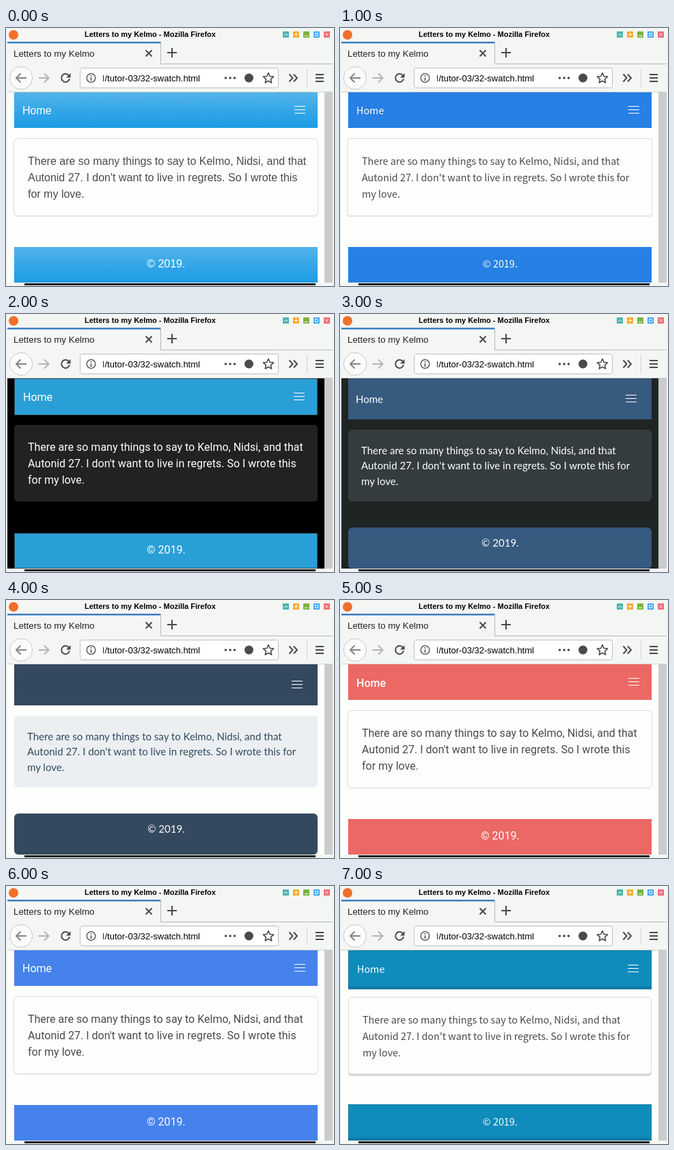
An HTML page for the animation above (8 s loop, 480 by 377 pixels).

```html
<!DOCTYPE html>
<html lang="en">
<head>
<meta charset="utf-8">
<title>Letters to my Kelmo</title>
<style>
html, body { margin: 0; width: 100%; height: 100%; overflow: hidden; background: #f4f6f4; }
svg { display: block; width: 480px; height: 377px; }
.ui { font-family: "Liberation Sans", Arial, sans-serif; white-space: pre; }
.line { fill: none; stroke: #4a4a4a; stroke-width: 2; }
</style>
</head>
<body>
<svg viewBox="0 0 480 377" xmlns="http://www.w3.org/2000/svg">
  <defs>
    <linearGradient id="sky" x1="0" y1="0" x2="0" y2="1">
      <stop offset="0" stop-color="#54b4eb"/>
      <stop offset=".6" stop-color="#2fa4e7"/>
      <stop offset="1" stop-color="#1d9ce5"/>
    </linearGradient>
    <clipPath id="view"><rect x="2" y="94" width="464" height="278"/></clipPath>
  </defs>
  <rect width="480" height="377" fill="#f4f6f4"/>

  <!-- title bar -->
  <circle cx="11" cy="10" r="7" fill="#f0702a"/>
  <text class="ui" x="115" y="13" font-size="11" font-weight="700">Letters to my Kelmo - Mozilla Firefox</text>
  <g id="buttons"></g>

  <!-- tab strip -->
  <path d="M226.500 20V52.500H478" fill="none" stroke="#b4b6b4"/>
  <rect x="2" y="20" width="224" height="2.500" fill="#3c7fc1"/>
  <text class="ui" x="11" y="42" font-size="13.330" fill="#222">Letters to my Kelmo</text>
  <path class="line" stroke-width="1.600" d="M204.500 32.500l9 9m0-9l-9 9"/>
  <path class="line" d="M236 36h14m-7-7v14"/>

  <!-- toolbar -->
  <circle cx="22" cy="73" r="16.500" fill="#fafbfa" stroke="#c6c8c6"/>
  <path class="line" style="stroke:#858785" d="M30 73H15m6.500-6.500L15 73l6.500 6.500"/>
  <path class="line" style="stroke:#b3b5b3" d="M47.500 73h15m-6.500-6.500l6.500 6.500-6.500 6.500"/>
  <path class="line" d="M92 69.500a6 6 0 1 0 1 4.800"/>
  <path fill="#4a4a4a" d="M94.500 66v6.500H88z"/>
  <rect x="108.500" y="58.500" width="290" height="29" rx="3" fill="#fff" stroke="#bcbebc"/>
  <circle class="line" cx="124.500" cy="73" r="6.300" style="stroke-width:1.300"/>
  <path class="line" style="stroke-width:1.600" d="M124.500 69v1.700m0 1.500v4.800"/>
  <rect x="142" y="69" width="1" height="9" fill="#222"/>
  <text class="ui" x="144.500" y="78" font-size="13">/tutor-03/32-swatch.html</text>
  <g fill="#4a4a4a">
    <circle cx="321.500" cy="73" r="1.800"/><circle cx="328" cy="73" r="1.800"/><circle cx="334.500" cy="73" r="1.800"/>
    <circle cx="355.500" cy="73" r="6.500"/>
  </g>
  <path id="star" class="line" style="stroke-width:1.600" stroke-linejoin="round"/>
  <path class="line" d="M414.500 67.500l5 5.500-5 5.500m6.500-11l5 5.500-5 5.500"/>
  <path d="M440.500 60v26" stroke="#d2d4d2"/>
  <path class="line" d="M453 68h12m-12 5h12m-12 5h12"/>
  <path d="M2 93.500h476" stroke="#cdcfcd"/>

  <!-- page -->
  <g id="page" clip-path="url(#view)"></g>
  <rect x="466" y="94" width="12" height="278" fill="#cbcbcb"/>
  <rect x="27" y="373" width="426" height="3" fill="#1b1b1b"/>
</svg>
<script>
const $ = id => document.getElementById(id);
const WHITE = '#fdfffd';
const ARIAL = '"Liberation Sans", Arial, sans-serif';
const ROBOTO = 'Roboto, sans-serif';
const LATO = 'Lato, sans-serif';
const SOURCE = '"Source Sans Pro", "Noto Sans CJK JP", "Noto Sans CJK SC", "Noto Sans CJK", sans-serif';

const WIDE = ['There are so many things to say to Kelmo, Nidsi, and that',
  "Autonid 27. I don't want to live in regrets. So I wrote this", 'for my love.'];
const TIGHT = [WIDE[0], WIDE[1] + ' for', 'my love.'];

// layout shared by most themes; each theme overrides a few values
const base = {
  bg: WHITE, ink: '#4a4a4a', font: ROBOTO, size: 16, lines: WIDE,
  navEnd: 146, home: [24, 126], homeInk: '#fff', homeStyle: '', burger: [422, 114.5],
  box: [162, 274], boxFill: WHITE, boxR: 5, ring: true,
  text: [32, 200, 24], foot: 320, footR: 0, footText: 350
};
// Noto Sans CJK draws its Latin letters about 12% larger
const source = { font: SOURCE, size: 14.33, lines: TIGHT };
const lato = {
  font: LATO, size: 15, lines: TIGHT, navEnd: 154, home: [23, 130], burger: [418, 118.5],
  box: [169, 274], boxR: 6, ring: false, text: [31, 204.7, 22.5],
  foot: 312, footR: 6, footText: 340
};

const themes = [
  { bar: 'url(#sky)', font: ARIAL },
  { ...source, bar: '#2780e3', boxR: 0 },
  { bar: '#2a9fd6', bg: '#000', ink: '#fff', navEnd: 148, edge: '#3a4a52', edgeBottom: 1,
    home: [25, 127], burger: [421, 115.5], boxFill: '#222', ring: false },
  { ...lato, bar: '#375a7f', bg: '#1f2424', ink: '#fff', boxFill: '#343c3d' },
  { ...lato, bar: '#34495e', ink: '#34495e', homeInk: '#34495e', boxFill: '#ebeff2' },
  { bar: '#eb6864', home: [24, 127], homeStyle: 'font-weight:500;font-stretch:85%' },
  { bar: '#4582ec' },
  { ...source, bar: '#0f8bbc', navEnd: 151, edge: '#0d78a3', edgeBottom: 4,
    home: [25, 127], burger: [421, 115.5], box: [162, 278], ring: false, lip: true,
    text: [33, 201, 24], foot: 319 }
].map(t => ({ ...base, ...t }));

const rect = (x, y, w, h, fill, r = 0, more = '') =>
  `<rect x="${x}" y="${y}" width="${w}" height="${h}" rx="${r}" fill="${fill}" ${more}/>`;
const label = (x, y, s, fill, more = '') => `<text x="${x}" y="${y}" fill="${fill}" ${more}>${s}</text>`;

function bar(t, top, end, r = 0) {
  if (!t.edge) return rect(12, top, 444, end - top, t.bar, r);
  return rect(12, top, 444, end - top, t.edge) +
    rect(13, top + 1, 442, end - top - 1 - t.edgeBottom, t.bar);
}

function card(t) {
  const [top, end] = t.box, h = end - top;
  let s = '';
  if (t.ring) {
    s += rect(12, top + 2, 444, h, '#0a0a0a', t.boxR, 'opacity=".06"');
    s += rect(11, top - 1, 446, h + 2, '#dcdedc', t.boxR && t.boxR + 1);
  }
  if (t.lip) {
    s += rect(12, top, 444, h, '#d9dbd9', 5);
    return s + rect(13, top + 1, 442, h - 5, t.boxFill, 4);
  }
  return s + rect(12, top, 444, h, t.boxFill, t.boxR);
}

function page(t) {
  const [bx, by] = t.burger, [tx, ty, step] = t.text;
  const burger = [0, 5, 10].map(d => `M${bx} ${by + d}h16`).join('');
  return rect(2, 94, 464, 278, t.bg) +
    bar(t, 94, t.navEnd) + card(t) + bar(t, t.foot, 372, t.footR) +
    `<path d="${burger}" stroke="#fff"/>` +
    `<g style='font-family:${t.font};font-size:${t.size}px'>` +
    label(...t.home, 'Home', t.homeInk, `style="${t.homeStyle}"`) +
    t.lines.map((s, i) => label(tx, ty + i * step, s, t.ink)).join('') +
    label(234.3, t.footText, '© 2019.', '#fff', 'text-anchor="middle"') + '</g>';
}

// window buttons: colour and glyph inside a 9px tile
$('buttons').innerHTML = [
  ['#4db6ac', 'M2 6l2.500-2.500L7 6'],
  ['#ffa726', 'M4.500 1.500v6m-3-3h6'],
  ['#7cb342', 'M2 6.500h5'],
  ['#42a5f5', 'M2.500 2.500h4v4h-4z'],
  ['#ef6c75', 'M2.500 2.500l4 4m0-4l-4 4']
].map(([c, d], i) => `<g transform="translate(${405 + i * 15} 5)">${rect(0, 0, 9, 9, c)}` +
  `<path d="${d}" fill="none" stroke="#fff"/></g>`).join('');

$('star').setAttribute('d', 'M' + Array.from({ length: 10 }, (_, i) => {
  const a = i * Math.PI / 5, r = i % 2 ? 3.7 : 8;
  return (384 + r * Math.sin(a)).toFixed(2) + ' ' + (73.5 - r * Math.cos(a)).toFixed(2);
}).join('L') + 'Z');

let shown = -1;
function draw(now) {
  const i = Math.floor(now / 1000) % themes.length;
  if (i !== shown) {
    shown = i;
    $('page').innerHTML = page(themes[i]);
  }
}
function tick() {
  draw(performance.now());
  requestAnimationFrame(tick);
}
tick();
</script>
</body>
</html>
```
